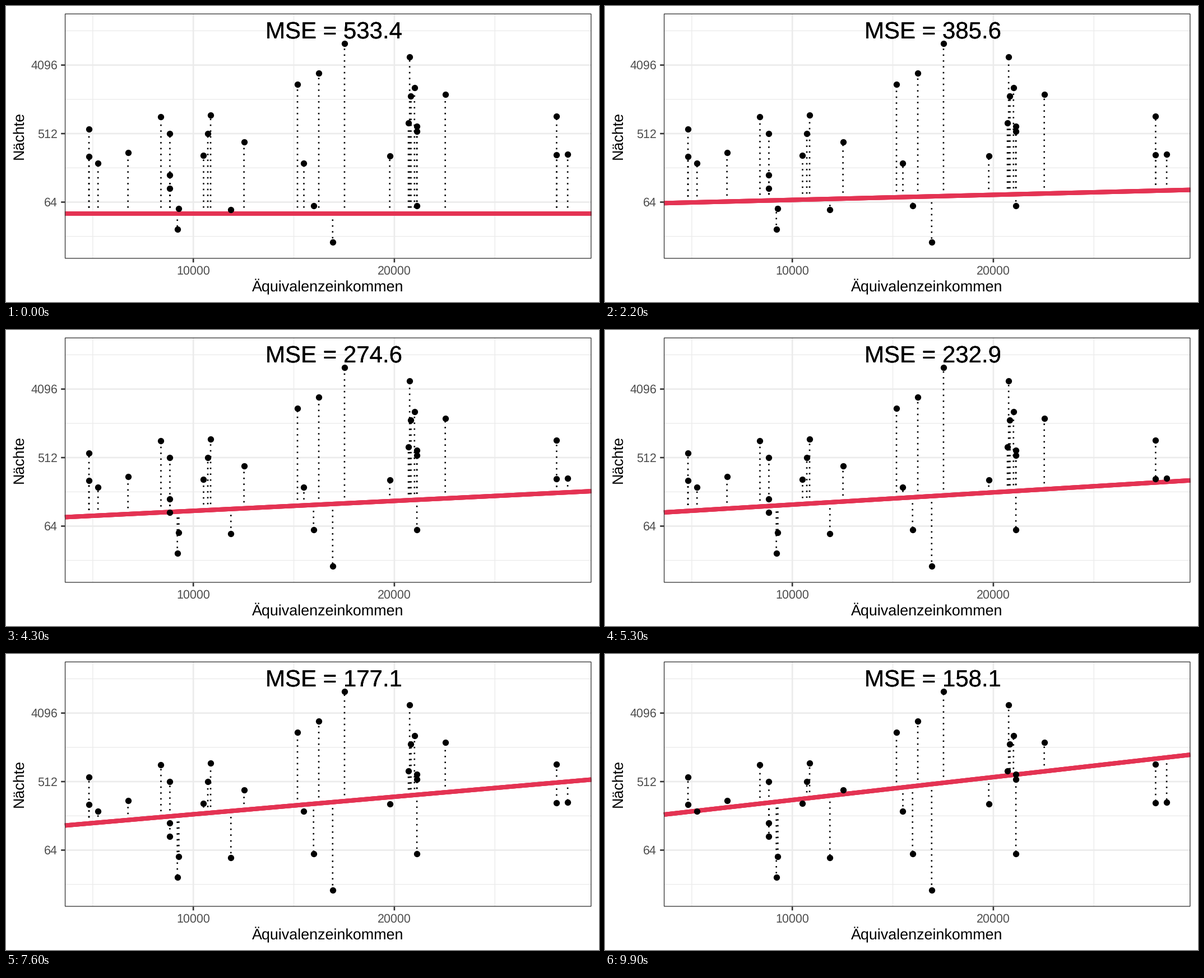
These frames come from a looping animation (1058x529 px, 10 s). A matplotlib script:

```python
import numpy as np
import matplotlib.pyplot as plt
from matplotlib.animation import FuncAnimation
from matplotlib.collections import LineCollection
from matplotlib.patches import Rectangle

W, H, DPI = 1058, 529, 92
FRAMES, INTERVAL = 100, 100
STEP = 11                       # frames per MSE state
LEFT, RIGHT, TOP, BOTTOM = 104.9, 1044.5, 13.5, 451.6
MID_X, MID_Y = (LEFT + RIGHT) / 2, (TOP + BOTTOM) / 2
STROKE, TICK = 2.61, 6.7
GRID, DARK, GREY, RED = "#EBEBEB", "#333333", "#4D4D4D", "#E43353"
COPIES = 3                      # overplotting hardens the edges

plt.rcParams["font.family"] = "Liberation Sans"
plt.rcParams["text.hinting"] = "none"

# Observed nights by income in thousands
NIGHTS = {
    4.81: [582, 255], 5.26: [208], 6.75: [290], 8.39: [853],
    8.835: [516, 145, 97], 9.205: [28], 9.28: [53], 10.51: [264],
    10.72: [512], 10.86: [893], 11.87: [51], 12.52: [398], 15.18: [2283],
    15.5: [210], 15.98: [57], 16.24: [3206], 16.93: [19], 17.52: [7940],
    19.77: [261], 20.7: [707], 20.76: [5256], 20.825: [1585], 21: [2062],
    21.12: [639, 548, 57], 22.53: [1682], 28.07: [867, 271], 28.62: [273],
}


def to_x(income):
    return 334.2 + 35.87 * (income - 10)


def to_y(nights):
    return 350.5 - 40.82 * np.log2(nights / 64)


def fit(x, frame):
    """Height of the regression line, which tilts steadily."""
    share = (x - LEFT) / (RIGHT - LEFT)
    return 371 - frame * (0.8485 + 1.0805 * share)


def mse(frame):
    k = round(frame / STEP)
    return 533.4 - 83.1 * k + 4.6 * k ** 2


def pt(px):
    return px * 72 / DPI


fig = plt.figure(figsize=(W / DPI, H / DPI), dpi=DPI, facecolor="white")
ax = fig.add_axes([0, 0, 1, 1])
ax.set_xlim(0, W)
ax.set_ylim(H, 0)
ax.axis("off")


def strokes(segs, color, width, z, **kw):
    lines = LineCollection(segs, colors=color, linewidths=pt(width), zorder=z, **kw)
    lines.set_snap(False)
    return ax.add_collection(lines, autolim=False)


def label(x, y, text, size, color="black", ha="center", **kw):
    return ax.text(x, y, text, fontsize=pt(size), color=color, ha=ha,
                   va="baseline", **kw)


def rows(ys, x0=LEFT, x1=RIGHT):
    return [[(x0, y), (x1, y)] for y in ys]


def cols(xs, y0=TOP, y1=BOTTOM):
    return [[(x, y0), (x, y1)] for x in xs]


# Grid, ticks and frame of the panel
x_ticks = {f"{k}000": to_x(k) for k in (10, 20)}
y_ticks = {str(8 ** p): to_y(8 ** p) for p in (2, 3, 4)}
minor_x = [to_x(k) for k in (5, 15, 25)]
minor_y = [to_y(8 ** (p + 0.5)) for p in range(1, 5)]

strokes(rows(minor_y) + cols(minor_x), GRID, STROKE / 2, 1)
strokes(rows(y_ticks.values()) + cols(x_ticks.values()), GRID, STROKE, 1.1)
strokes(rows(y_ticks.values(), LEFT - TICK, LEFT)
        + cols(x_ticks.values(), BOTTOM, BOTTOM + TICK), DARK, STROKE, 1.2)

inset = STROKE / 4
border = Rectangle((LEFT + inset, TOP + inset), RIGHT - LEFT - 2 * inset,
                   BOTTOM - TOP - 2 * inset, fill=False, edgecolor=DARK,
                   linewidth=pt(STROKE / 2), zorder=6)
border.set_snap(False)
ax.add_patch(border)

for text, y in y_ticks.items():
    label(92.3, y + 7.6, text, 21.55, GREY, ha="right")
for text, x in x_ticks.items():
    label(x, 479.6, text, 21.55, GREY)
label(MID_X - 0.5, 510, "Äquivalenzeinkommen", 26.94)
label(31, MID_Y - 1, "Nächte", 26.94, rotation=90, rotation_mode="anchor")

# Residuals, regression line, points and caption
points = np.array([(to_x(k), to_y(n)) for k, ns in NIGHTS.items() for n in ns])
residuals = strokes([], "black", STROKE, 2, linestyles=[(0, (1, 3))])
line = strokes([], RED, 7.83, 3)
dots = ax.scatter(*points.T, s=pt(11.3) ** 2, c="black", linewidths=0, zorder=4)
dots.set_snap(False)
captions = [label(584.8, 57.4, "", 42, zorder=5) for _ in range(COPIES)]


def update(frame):
    residuals.set_segments([[(x, fit(x, frame)), (x, y)] for x, y in points])
    ends = [(x, fit(x, frame)) for x in (LEFT, RIGHT)]
    line.set_segments([ends] * COPIES)
    for caption in captions:
        caption.set_text(f"MSE = {mse(frame):.1f}")
    return [residuals, line, *captions]


anim = FuncAnimation(fig, update, frames=FRAMES, interval=INTERVAL,
                     init_func=lambda: update(0), repeat=True, repeat_delay=0,
                     blit=False)
plt.show()
```
